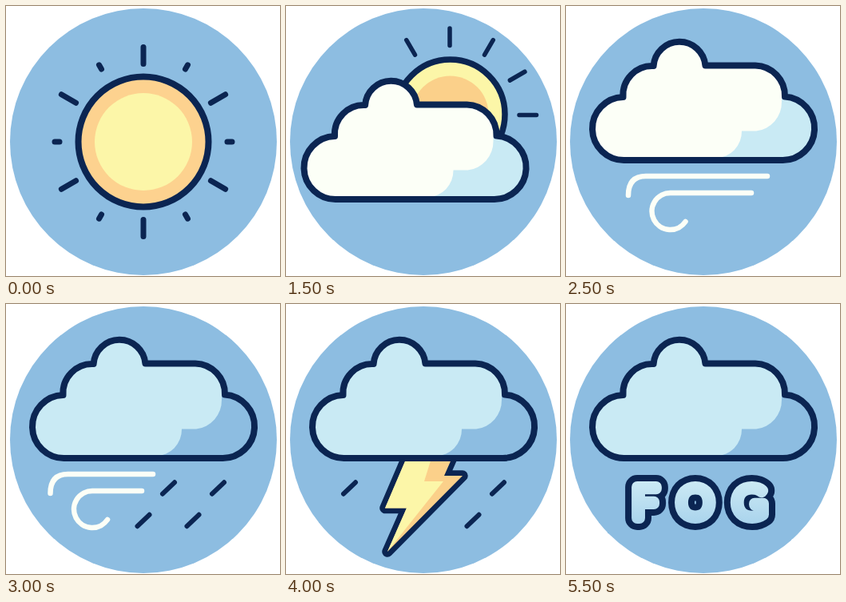
These frames come from a looping animation (343x338 px, 6 s). An HTML page:

```html
<!DOCTYPE html>
<html lang="en">
<head>
<meta charset="utf-8">
<title>Weather</title>
<style>
  html, body { margin: 0; width: 100%; height: 100%; overflow: hidden; background: #fff; }
  svg { display: block; width: 100%; height: 100%; }
  .ink { stroke: #0b2552; stroke-linejoin: round; stroke-linecap: round; }
  .wind { fill: none; stroke: #fcfff7; stroke-width: 6.5; stroke-linecap: round; }
  #fog { font: 300 56px Lato, Inter, sans-serif; text-anchor: middle; }
  #cloud { --main: #fcfff7; --shade: #c9eaf4; }
  #cloud.dark { --main: #c9eaf4; --shade: #8dbde1; }
</style>
</head>
<body>
<svg viewBox="0 0 343 338">
  <defs>
    <text id="fog" x="99 162 230" y="268">FOG</text>
    <linearGradient id="mist" gradientUnits="userSpaceOnUse" x1="0" y1="220" x2="0" y2="276">
      <stop stop-color="#cdebf5"/>
      <stop offset="1" stop-color="#a9d3ec"/>
    </linearGradient>
  </defs>
  <circle cx="172" cy="170" r="167" fill="#8dbde1"/>

  <g data-on="0 1 2">
    <circle class="ink" cx="172" cy="170" r="81.5" fill="#fdd28f" stroke-width="8"/>
    <circle cx="172" cy="170" r="61" fill="#fcf6a8"/>
  </g>
  <path id="rays" class="ink" data-on="0" stroke-width="7"/>

  <g data-on="2">
    <path fill="#c9eaf4" d="M75 181H162A27 27 0 0 1 162 235H75Z"/>
    <path fill="#fcfff7" d="M74 181A17.1 17.1 0 0 1 108 181H138Q149 212 127 235H75A27 27 0 0 1 75 181Z"/>
    <path class="ink" fill="none" stroke-width="7.5"
      d="M74 181A17.1 17.1 0 0 1 108 181H162A27 27 0 0 1 162 235H75A27 27 0 0 1 74 181Z"/>
  </g>

  <g data-on="3">
    <circle class="ink" cx="205.5" cy="135.5" r="68.5" fill="#fcf6a8" stroke-width="7.5"/>
    <circle cx="205.5" cy="135.5" r="48" fill="#fbd08a"/>
    <path id="halfRays" class="ink" stroke-width="5.5"/>
  </g>

  <path id="windLong" class="wind" data-on="5"/>
  <path id="windShort" class="wind" data-on="6"/>
  <path id="rain" class="ink" stroke-width="6"/>

  <g data-on="8">
    <path class="ink" fill="#fbd08a" stroke-width="13.5" paint-order="stroke"
      d="M152 190L124 255.5H151L127 310L221 215H198L209 190Z"/>
    <path fill="#fcf6a8" d="M152 190L124 255.5H151L127 310L197 222H173L183 190Z"/>
  </g>

  <g id="cloud">
    <path class="edge" fill="var(--shade)"/>
    <path id="lit" fill="var(--main)"/>
    <path class="edge ink" fill="none" stroke-width="8"/>
  </g>

  <g data-on="11">
    <use href="#fog" class="ink" stroke-width="30"/>
    <use href="#fog" fill="url(#mist)" stroke="url(#mist)" stroke-width="14" stroke-linejoin="round"/>
  </g>
</svg>
<script>
const STEP = 500, STEPS = 12;
const $ = id => document.getElementById(id);
const draw = (id, d) => $(id).setAttribute('d', d);

function ray(cx, cy, deg, from, to) {
  const c = Math.cos(deg * Math.PI / 180), s = Math.sin(deg * Math.PI / 180);
  return `M${cx + from * c} ${cy - from * s}L${cx + to * c} ${cy - to * s}`;
}

let rays = '', half = '';
for (let a = 0; a < 360; a += 30) {
  rays += a % 60 ? ray(172, 170, a, 97.5, 118.5) : ray(172, 170, a, 105, 111);
  if (a <= 120) half += ray(205, 136.5, a, 87, 108.5);
}
draw('rays', rays);
draw('halfRays', half);

const wind = (dx, end1, end2) =>
  `M${78 + dx} 237Q${78 + dx} 213 ${100 + dx} 213H${end1}` +
  `M${end2} 234H${130.5 + dx}A23 23 0 1 0 ${149.5 + dx} 270`;
draw('windLong', wind(0, 252, 232));
draw('windShort', wind(-22.5, 184, 170));

const outline = 'M73.5 193A39.5 39.5 0 0 1 71.5 114A36.5 36.5 0 0 1 109.6 75A32.5 32.5 0 0 1 174.4 74.5H237A38 38 0 0 1 274 113.5';
for (const p of document.querySelectorAll('.edge')) p.setAttribute('d', outline + 'A39.8 39.8 0 0 1 270.5 193Z');
draw('lit', outline + 'H270V120A36 36 0 0 1 238 156.5H220A32 33 0 0 1 188 190V193Z');

// Drops: 0-3 upper row, 4-6 lower row
const drop = i => {
  const x = i < 4 ? 79.5 + 62 * i : 110 + 62 * (i - 4), y = i < 4 ? 230.5 : 271;
  return `M${x - 7.5} ${y + 7.2}l15 -14.4`;
};
const allDrops = [0, 1, 2, 3, 4, 5, 6];
const drops = { 6: [2, 3, 5, 6], 7: allDrops, 8: [0, 3, 6], 9: allDrops };

const scenes = [...document.querySelectorAll('[data-on]')].map(el => [el, el.dataset.on.split(' ').map(Number)]);
const show = (el, on) => el.setAttribute('display', on ? 'inline' : 'none');

function frame() {
  const n = Math.floor(performance.now() / STEP) % STEPS;
  for (const [el, steps] of scenes) show(el, steps.includes(n));
  draw('rain', (drops[n] || []).map(drop).join(''));
  const cloud = $('cloud');
  show(cloud, n > 2);
  cloud.setAttribute('class', n > 5 ? 'dark' : '');
  cloud.setAttribute('transform', n < 5 ? 'translate(-10.5 49)' : '');
  requestAnimationFrame(frame);
}
frame();
</script>
</body>
</html>
```
